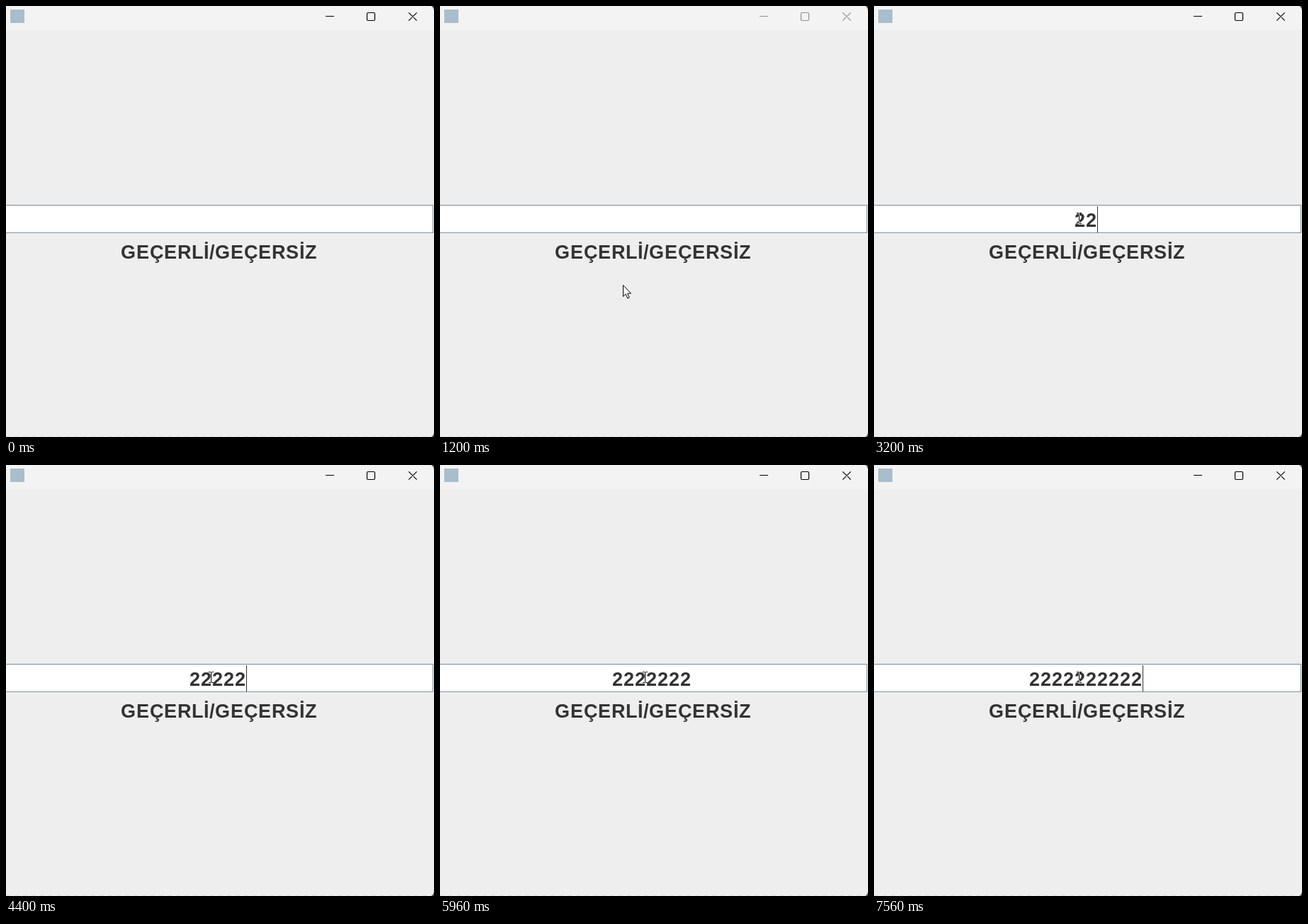
An HTML page with a canvas for the animation above (8 s loop, 604 by 609 pixels).

```html
<!DOCTYPE html>
<html lang="tr">
<head>
<meta charset="utf-8">
<title>GEÇERLİ/GEÇERSİZ</title>
<style>
html, body { margin: 0; width: 100%; height: 100%; overflow: hidden; background: #eee; }
canvas { display: block; width: 604px; height: 609px; }
</style>
</head>
<body>
<canvas id="stage" width="604" height="609"></canvas>
<script>
const W = 604, H = 609, LOOP = 8000, TICK = 40, BLINK = 520;
const ctx = document.getElementById('stage').getContext('2d');
const FONT = 'bold 27px "Liberation Sans", Arial, sans-serif';

// One digit is typed at each of these times.
const KEYS = [2400, 3200, 3600, 4000, 4400, 4800, 5360, 6280, 6760, 7560];
const BLUR = 400, CLICK = 1840, ACTIVE = 1920, FOCUS = 2040;

const mix = (a, b, k) => a + (b - a) * k;
const progress = (t, from, to) => Math.min(1, Math.max(0, (t - from) / (to - from)));
const easeOut = k => 1 - (1 - k) ** 1.5;
const curve = (a, b, c, k) => mix(mix(a, b, k), mix(b, c, k), k);

function box(x, y, w, h, color) {
  ctx.fillStyle = color;
  ctx.fillRect(x, y, w, h);
}

// Glyph advances are widened to the next whole pixel.
function text(str, x, y) {
  ctx.font = FONT;
  ctx.fillStyle = '#333';
  for (const ch of str) {
    ctx.fillText(ch, x, y);
    x += Math.floor(ctx.measureText(ch).width) + 1;
  }
}

function titleBar(active) {
  const ink = active ? '#000' : '#8f8f8f';
  box(0, 0, W, 34, '#f3f3f3');
  box(6, 5, 20, 19, '#a9bdcc');
  box(451, 14, 12, 1, ink);
  ctx.strokeStyle = ink;
  ctx.lineWidth = 1.2;
  ctx.beginPath();
  ctx.roundRect(509.5, 9.5, 11, 11, 1.5);
  ctx.moveTo(568.3, 9.3);
  ctx.lineTo(579.7, 20.7);
  ctx.moveTo(579.7, 9.3);
  ctx.lineTo(568.3, 20.7);
  ctx.stroke();
}

function corner(y, dir) {
  ctx.fillStyle = '#444';
  ctx.beginPath();
  ctx.moveTo(W - 4, y);
  ctx.quadraticCurveTo(W - 1, y + dir, W, y + 6 * dir);
  ctx.lineTo(W, y);
  ctx.fill();
}

function field() {
  box(0, 281, 603, 40, '#7a8a99');
  box(0, 282, 602, 38, '#fff');
  box(0, 321, W, 1, '#fafafa');
  box(603, 281, 1, 41, '#fafafa');
}

function arrow(x, y) {
  ctx.save();
  ctx.translate(x + 0.5, y + 0.5);
  ctx.fillStyle = '#fff';
  ctx.strokeStyle = '#000';
  ctx.lineWidth = 1;
  const shape = new Path2D('M0 0V16L3.7 12.6L6.3 18.6L8.7 17.5L6.1 11.7L11 11.5Z');
  ctx.fill(shape);
  ctx.stroke(shape);
  ctx.restore();
}

function beam(x, y, invert) {
  ctx.save();
  if (invert) ctx.globalCompositeOperation = 'difference';
  const ink = invert ? '#fff' : '#33330f';
  box(x, y - 7, 1, 14, ink);
  for (const edge of [y - 8, y + 7]) {
    box(x - 3, edge, 3, 1, ink);
    box(x + 1, edge, 3, 1, ink);
  }
  ctx.restore();
}

function pointer(t, typed) {
  if (t < 440) return;
  const enter = progress(t, 440, 880) ** 1.6;
  const swing = easeOut(progress(t, 880, 1640));
  const settle = progress(t, ACTIVE, 2000);
  const x = Math.round(curve(mix(401, 325, enter), 213, mix(286, 289, settle), swing));
  const y = Math.round(curve(mix(604, 540, enter), 400, mix(294, 300, settle), swing));
  if (t >= CLICK && t < ACTIVE) {
    ctx.fillStyle = 'rgba(255,255,0,.5)';
    ctx.beginPath();
    ctx.arc(x - 1.7, y - 0.7, 15, 0, Math.PI * 2);
    ctx.fill();
  }
  if (y > 281 && y < 320) beam(x, y, typed > 0);
  else arrow(x, y);
}

// The caret restarts its blink at focus and at every key.
function caretOn(t, typed) {
  if (t >= BLUR && t < FOCUS) return false;
  const since = typed ? KEYS[typed - 1] : t < FOCUS ? 80 - 2 * BLINK : FOCUS;
  return Math.floor((t - since) / BLINK) % 2 === 0;
}

function draw(t) {
  const typed = KEYS.filter(key => key <= t).length;

  box(0, 0, W, H, '#eee');
  titleBar(t < BLUR || t >= ACTIVE);
  field();
  text('2'.repeat(typed), 299 - 8 * typed, 312);
  if (caretOn(t, typed)) box(299 + 8 * typed, 283, 1, 37, '#333');
  text('GEÇERLİ/GEÇERSİZ', 162, 357);
  for (let x = 0; x < W; x += 12) box(x, 608, 6, 1, '#d9d9d9');
  corner(0, 1);
  corner(H, -1);
  pointer(t, typed);
}

const start = performance.now();
function frame() {
  const t = (performance.now() - start) % LOOP;
  draw(Math.floor(t / TICK) * TICK);
  requestAnimationFrame(frame);
}
frame();
</script>
</body>
</html>
```
